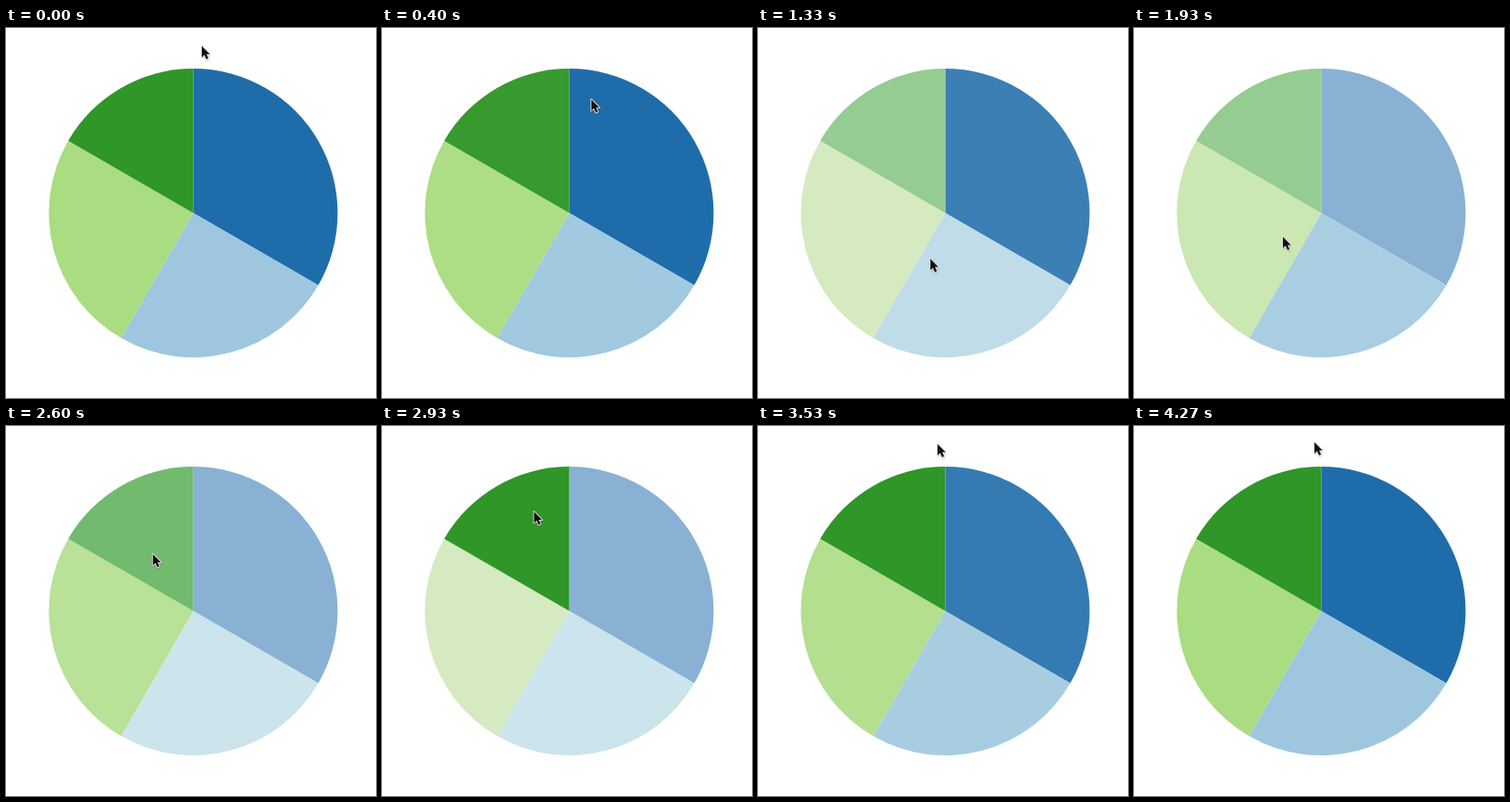
An HTML page that plays this animation: 410x410 px, repeating every 4330 ms.

```html
<!DOCTYPE html>
<html lang="en">
<head>
<meta charset="utf-8">
<title>Pie hover</title>
<style>
  html, body { margin: 0; width: 100%; height: 100%; overflow: hidden; background: #fff; }
  svg { display: block; width: 100%; height: 100%; }
</style>
</head>
<body>
<svg viewBox="0 0 410 410">
  <defs>
    <filter id="soft" x="-50%" y="-50%" width="200%" height="200%">
      <feGaussianBlur stdDeviation="1"/>
    </filter>
    <path id="arrow" d="M0 0V12.4L2.9 9.8L5 14.6L7.2 13.6L5.1 9H8.8Z"/>
  </defs>
  <g id="pie"></g>
  <g id="cursor">
    <use href="#arrow" x="0.6" y="1.4" opacity=".45" filter="url(#soft)"/>
    <use href="#arrow" fill="#111" stroke="#e4e4e4" stroke-width="1.8" stroke-linejoin="round" paint-order="stroke"/>
  </g>
</svg>
<script>
const LOOP = 4330, STEP = 200 / 3, FADE = 500;
const CX = 207.5, CY = 205, R = 160;

const slices = [
  { to: 120, full: [30, 109, 170], dim: [136, 177, 212] },
  { to: 210, full: [158, 199, 223], dim: [204, 228, 235] },
  { to: 300, full: [170, 220, 129], dim: [213, 234, 193] },
  { to: 360, full: [47, 150, 40], dim: [149, 204, 146] }
];

// The pointer glides from rest to rest; at `enter` it reaches slice `over`
const home = { x: 217, y: 20 };
const moves = [
  { start: 70, end: 900, x: 260, y: 190, enter: 270, over: 0 },
  { start: 930, end: 1500, x: 173, y: 273, enter: 1130, over: 1 },
  { start: 1670, end: 2200, x: 157, y: 189, enter: 1740, over: 2 },
  { start: 2270, end: 2930, x: 168.5, y: 95, enter: 2380, over: 3 },
  { start: 3000, end: 3370, x: 199, y: 20, enter: 3220, over: null },
  { start: 3730, end: 4070, x: 200, y: 18 }
];

const progress = (t, start, end) => Math.min(1, Math.max(0, (t - start) / (end - start)));
const smooth = u => u * u * (3 - 2 * u);
const cubic = u => u < .5 ? 4 * u ** 3 : 1 - 4 * (1 - u) ** 3;
const mix = (a, b, k) => a + (b - a) * k;

function rim(deg) {
  const a = deg * Math.PI / 180;
  return `${CX + R * Math.sin(a)} ${CY - R * Math.cos(a)}`;
}

const pie = document.getElementById('pie');
const cursor = document.getElementById('cursor');
slices.forEach((s, i) => {
  const from = i ? slices[i - 1].to : 0;
  s.path = document.createElementNS('http://www.w3.org/2000/svg', 'path');
  s.path.setAttribute('d', `M${CX} ${CY}L${rim(from)}A${R} ${R} 0 0 1 ${rim(s.to)}Z`);
  pie.appendChild(s.path);
});

// 0: full colour, 1: dimmed
function dimming(slice, t) {
  return moves.filter(m => m.enter).reduce((level, m) => {
    const goal = m.over === null || m.over === slice ? 0 : 1;
    return mix(level, goal, cubic(progress(t, m.enter, m.enter + FADE)));
  }, 0);
}

function pointer(t) {
  return moves.reduce((p, m) => {
    const k = smooth(progress(t, m.start, m.end));
    return { x: mix(p.x, m.x, k), y: mix(p.y, m.y, k) };
  }, home);
}

function draw(ms) {
  const t = Math.floor((ms % LOOP + 4) / STEP) * STEP;
  slices.forEach((s, i) => {
    const d = dimming(i, t);
    const rgb = s.full.map((c, k) => Math.round(mix(c, s.dim[k], d)));
    s.path.setAttribute('fill', `rgb(${rgb})`);
  });
  const { x, y } = pointer(t);
  cursor.setAttribute('transform', `translate(${x} ${y})`);
}

const begin = performance.now();
function tick() {
  draw(performance.now() - begin);
  requestAnimationFrame(tick);
}
tick();
</script>
</body>
</html>
```
